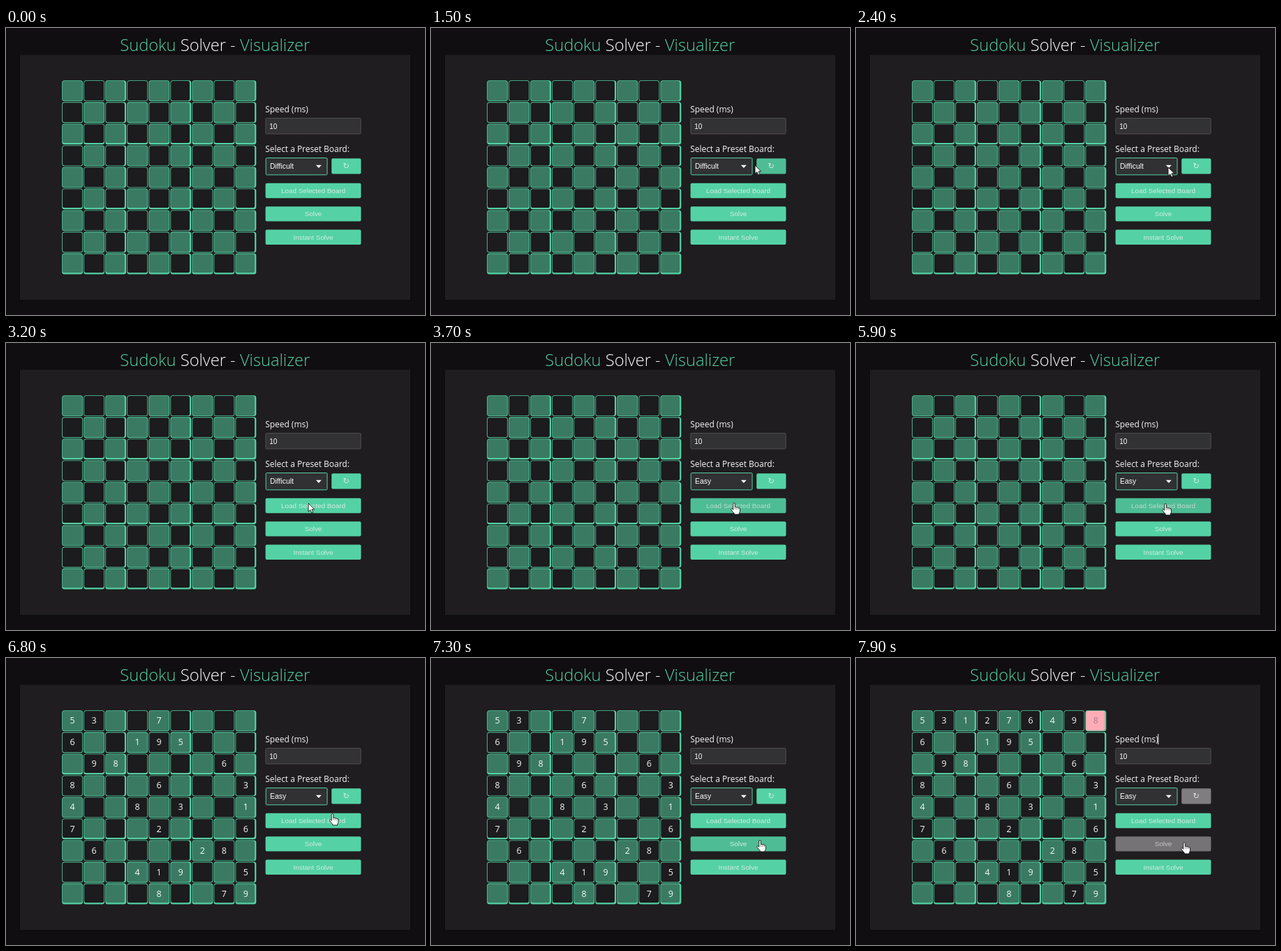
An HTML page for the animation above (8 s loop, 600 by 412 pixels).

```html
<!DOCTYPE html>
<html lang="en">
<head>
<meta charset="utf-8">
<title>Sudoku Solver</title>
<style>
  html, body { margin: 0; width: 100%; height: 100%; overflow: hidden; background: #100e10; }
  svg { display: block; width: 100vw; height: 100vh; }
  .ui { font-family: "Open Sans", sans-serif; fill: #f8f8f8; }
  .form { font-family: "Liberation Sans", Arial, sans-serif; font-size: 10px; }
  .mid { text-anchor: middle; }
</style>
</head>
<body>
<svg id="stage" viewBox="0 0 600 412" xmlns="http://www.w3.org/2000/svg"></svg>
<script>
const LOOP = 8000, STEP = 100;
const GREEN = '#54d2a5', HOVER = '#4ebd96', GRAY = '#7f7d80';
const stage = document.getElementById('stage');

function add(tag, attrs, text, parent = stage) {
  const node = document.createElementNS('http://www.w3.org/2000/svg', tag);
  for (const key in attrs) node.setAttribute(key, attrs[key]);
  if (text !== undefined) node.textContent = text;
  parent.appendChild(node);
  return node;
}
const box = (x, y, width, height, rx, fill, more) => add('rect', { x, y, width, height, rx, fill, ...more });

// Page and title
box(0, 0, 600, 412, 0, '#100e10');
box(19, 39, 561, 353, 1, '#0b0a0c');
box(20, 38.5, 559, 352, 0, '#1f1d1f');
const title = add('text', { x: 299.3, y: 33, class: 'ui mid', 'font-size': 23.7, 'font-weight': 300 });
add('tspan', { fill: GREEN }, 'Sudoku ', title);
add('tspan', { fill: '#fff' }, 'Solver - ', title);
add('tspan', { fill: GREEN }, 'Visualizer', title);

// Board
const PITCH = 31.04, SIZE = 29.8, THIN = 0.8, THICK = 2.2;
const cells = [];
for (let i = 0; i < 81; i++) {
  const row = Math.floor(i / 9), col = i % 9;
  const x = 80.2 + col * PITCH, y = 75.3 + row * PITCH;
  const right = col % 3 === 2 ? THICK : THIN, bottom = row % 3 === 2 ? THICK : THIN;
  const fill = (row + col) % 2 ? '#1c1b1d' : '#3a7a62';
  box(x, y, SIZE, SIZE, 3.5, GREEN);
  const face = box(x + THIN, y + THIN, SIZE - THIN - right, SIZE - THIN - bottom, 2.8, fill);
  const label = add('text', { x: x + 14.8, y: y + 19, class: 'ui mid', 'font-size': 12.5 }, '');
  cells.push({ face, label, fill });
}

// Controls
const caption = (y, text) => add('text', { x: 371.2, y, class: 'ui', 'font-size': 11.95 }, text);
caption(121, 'Speed (ms)');
caption(177.5, 'Select a Preset Board:');
const caret = box(432.3, 109, 1, 15, 0, '#f0f0f0');
box(371.9, 129.5, 136.2, 22.5, 1.5, '#323133', { stroke: '#555457', 'stroke-width': 0.9 });
add('text', { x: 377.3, y: 144.5, class: 'form', fill: '#fff' }, '10');
box(372.2, 186.5, 87.8, 24.3, 1.5, '#313032', { stroke: GREEN, 'stroke-width': 1 });
const choice = add('text', { x: 378, y: 202, class: 'form', fill: '#fff', style: 'font-size:10.4px' }, '');
add('path', { d: 'M443.8 196.8h8l-4 4.1z', fill: '#fff' });

function button(x, y, width, height, text, size = 9.85) {
  const face = box(x, y, width, height, 2, GREEN);
  const label = add('text', {
    x: x + width / 2, y: y + height / 2 + size * 0.35, class: 'form mid', style: `font-size:${size}px`
  }, text);
  return { face, label };
}
const buttons = {
  refresh: button(466.2, 187.2, 42.2, 22.4, '↻', 11.5),
  load: button(371.6, 222.8, 136.8, 21.4, 'Load Selected Board'),
  solve: button(371.6, 256.2, 136.8, 21.4, 'Solve'),
  instant: button(371.6, 289.5, 136.8, 21.4, 'Instant Solve')
};
buttons.refresh.label.style.fontFamily = '"DejaVu Sans", sans-serif';

// Pointers, with the hot spot at the origin
const outline = { stroke: '#111', 'stroke-width': 0.9, 'stroke-linejoin': 'round', fill: '#fff' };
const arrow = add('path', { ...outline, d: 'M0 0V12.2L2.8 9.6L4.8 14L6.8 13.1L4.9 8.9H8.7Z' });
const hand = add('g', {});
add('path', {
  ...outline,
  d: 'M-1.3 1Q-1.2-.4 0-.4T1.3 1V5.6Q2.6 4.6 3.8 6Q5.2 5.2 6.3 6.6Q8.4 6.2 8.5 8V11Q8.4 13 7.2 14.5V16H.2V14.6' +
     'Q-1.8 12.7-4 9.5Q-4.6 8-3.4 7.7Q-2.4 7.7-1.3 9.3Z'
}, undefined, hand);
add('path', { d: 'M1.3 5.8V9M3.8 6.3V9.2M6.3 7V9.4', stroke: '#333', 'stroke-width': 0.6, fill: 'none' }, undefined, hand);

// Pointer path: time, x, y
const path = [
  [1000, 504, 212], [1200, 488, 203], [1500, 464, 197], [1900, 464, 197],
  [2100, 456, 198], [2400, 447, 200], [2500, 447, 200], [2800, 437, 214],
  [3200, 433, 230], [3400, 432, 232], [3700, 434, 230], [4100, 434, 230],
  [4300, 435, 229.5], [4800, 435, 229.5], [5300, 443, 231], [5900, 443, 231],
  [6400, 447, 230], [6800, 467.5, 224], [7000, 472, 240], [7300, 471, 262],
  [7500, 470, 265], [7900, 470, 265]
];
const ease = k => k * k * (3 - 2 * k);
function pointerAt(t) {
  const next = path.findIndex(p => p[0] > t);
  if (next < 0) return path[path.length - 1].slice(1);
  if (next === 0) return null;
  const [t0, x0, y0] = path[next - 1], [t1, x1, y1] = path[next];
  const k = ease((t - t0) / (t1 - t0));
  return [x0 + (x1 - x0) * k, y0 + (y1 - y0) * k];
}

const PUZZLE = '53..7....' + '6..195...' + '.98....6.' + '8...6...3' + '4..8.3..1' +
               '7...2...6' + '.6....28.' + '...419..5' + '....8..79';
const SOLVING = [[7700, '5312748..', 6], [7800, '531276...', 5], [7900, '531276498', 8]];
const LOADED = 6000, PICKED = 3700, SOLVE = 7700;

function paint(name, fill, ink) {
  buttons[name].face.setAttribute('fill', fill);
  buttons[name].label.setAttribute('fill', ink);
}
const show = (node, on) => node.setAttribute('display', on ? 'inline' : 'none');
const between = (t, a, b) => t >= a && t < b;

function render(time) {
  const t = Math.floor((time % LOOP) / STEP) * STEP;
  const attempt = SOLVING.filter(s => s[0] <= t).pop();
  const digits = t < LOADED ? '' : attempt ? attempt[1] + PUZZLE.slice(9) : PUZZLE;
  cells.forEach(({ face, label, fill }, i) => {
    const trying = attempt && attempt[2] === i;
    const digit = digits[i];
    label.textContent = digit && digit !== '.' ? digit : '';
    label.style.fill = trying ? '#a58089' : '';
    face.setAttribute('fill', trying ? '#ffacb7' : fill);
  });

  choice.textContent = t < PICKED ? 'Difficult' : 'Easy';
  const busy = t >= SOLVE;
  const ink = '#d3ebe1';
  const overLoad = between(t, PICKED, 6800);
  paint('refresh', busy ? GRAY : between(t, 1100, 2100) ? HOVER : GREEN, busy ? '#e2e2e2' : ink);
  paint('load', overLoad ? HOVER : GREEN, overLoad ? '#bfd9ce' : ink);
  paint('solve', busy ? '#757376' : between(t, 7200, SOLVE) ? HOVER : GREEN, busy ? '#c6c6c6' : ink);
  paint('instant', GREEN, ink);
  show(caret, busy);

  const spot = pointerAt(t);
  const pointing = t >= PICKED;
  show(arrow, spot && !pointing);
  show(hand, spot && pointing);
  if (spot) (pointing ? hand : arrow).setAttribute('transform', `translate(${spot[0]} ${spot[1]})`);
}

const start = performance.now();
function tick() {
  render(performance.now() - start);
  requestAnimationFrame(tick);
}
render(0);
requestAnimationFrame(tick);
</script>
</body>
</html>
```
